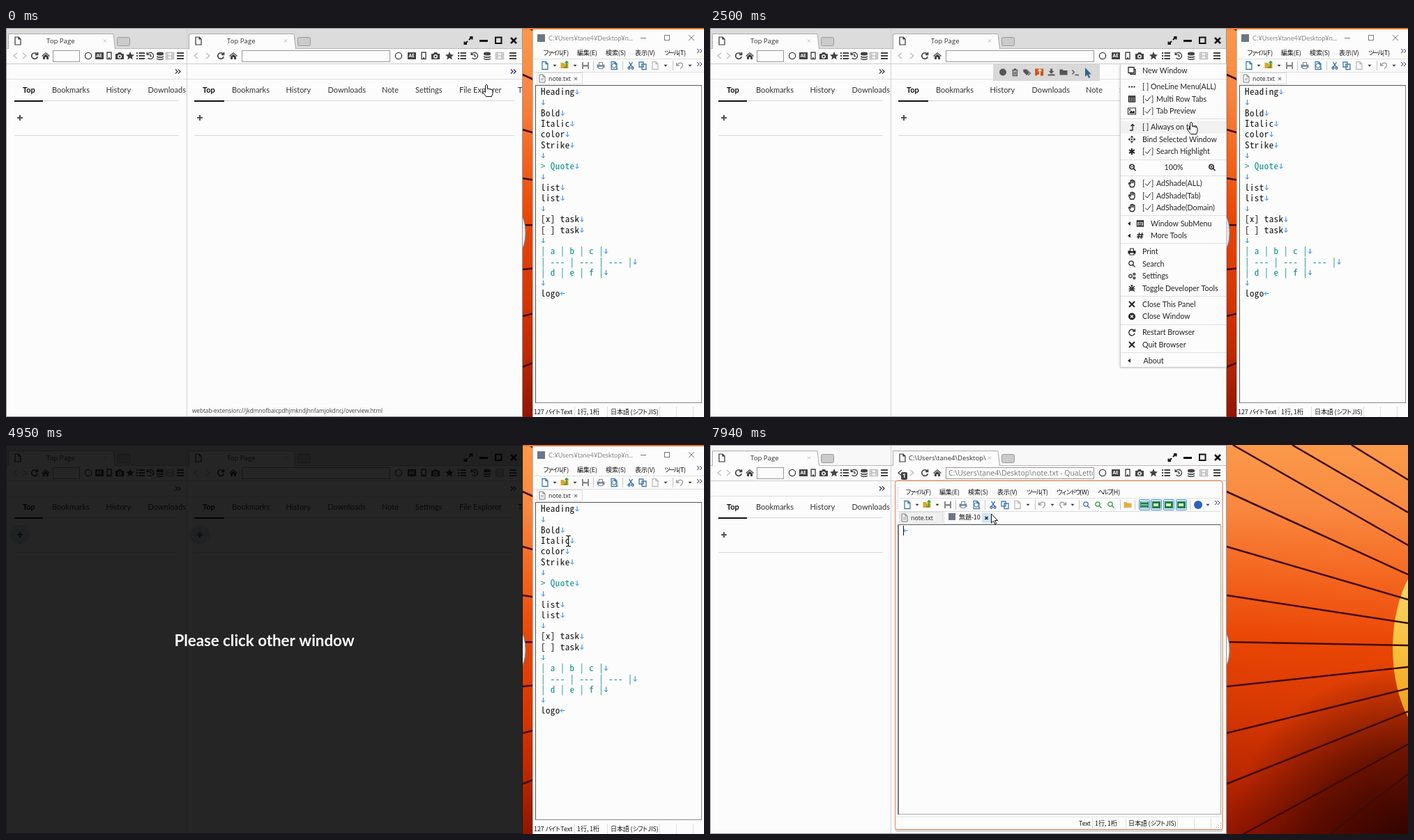
Write an HTML page with a canvas that moves like this. It is 1001 px wide and 559 px high and loops after 8000 ms.

```html
<!DOCTYPE html>
<html lang="ja">
<head>
<meta charset="utf-8">
<title>Bind a window</title>
<style>
html, body { margin: 0; width: 100%; height: 100%; overflow: hidden; background: #fcfcfc; }
canvas { display: block; }
</style>
</head>
<body>
<canvas id="stage" width="1001" height="559"></canvas>
<script>
const c = document.getElementById('stage').getContext('2d');
const LOOP = 8000, PAPER = '#fcfcfc';
const lato = (size, weight = 400) => `${weight} ${size}px Lato, sans-serif`;
const open = (size, weight = 400) => `${weight} ${size}px "Open Sans", sans-serif`;
const CJK = '9px "Noto Sans CJK JP", "Noto Sans CJK", sans-serif';
const MONO = '13px "Noto Sans Mono CJK JP", "Noto Sans Mono", monospace';
const PITCH = 6.93, ROW = 15.27;

// Each icon is centred on 0,0; the first letter says stroke or fill.
const ICONS = {
  back: 'sM3-4L-2 0L3 4', next: 'sM-3-4L2 0L-3 4',
  reload: 'sM3.5-2.5A4.3 4.3 0 1 0 4.2 1.2M4.5-5V-1.7H1',
  home: 'fM0-5L6 0L5 1L0-3.4L-5 1L-6 0ZM-4 1L0-2.4L4 1V5H1V2H-1V5H-4Z',
  ring: 'sM-4.6 0a4.6 4.6 0 1 0 9.2 0a4.6 4.6 0 1 0-9.2 0Z',
  dot: 'fM-5 0a5 5 0 1 0 10 0a5 5 0 1 0-10 0Z',
  box: 'fM-6-5H6V5H-6Z',
  phone: 'sM-3-5H3V4.5H-3ZM-1 3H1',
  camera: 'fM-6-3H-3L-2-5H2L3-3H6V5H-6ZM0-2a3 3 0 1 0 .01 0ZM0-.5a1.5 1.5 0 1 1-.01 0Z',
  star: 'fM0-6L1.8-2L6-1.6L2.8 1.2L3.8 5.4L0 3.1L-3.8 5.4L-2.8 1.2L-6-1.6L-1.8-2Z',
  list: 'sM-6-4H-4M-2.5-4H6M-6 0H-4M-2.5 0H6M-6 4H-4M-2.5 4H6',
  history: 'sM-4-2.5A4.6 4.6 0 1 1-3.5 3M-4.8-5V-1.7H-1.5M0-2.5V.5H2',
  base: 'fM-5-3.5A5 2 0 0 1 5-3.5V-2.5A5 2 0 0 1-5-2.5ZM-5-.8A5 2 0 0 0 5-.8V1A5 2 0 0 1-5 1ZM-5 2.5A5 2 0 0 0 5 2.5V4A5 2 0 0 1-5 4Z',
  film: 'sM-5.5-4.5H5.5V4.5H-5.5ZM-3-4.5V4.5M3-4.5V4.5M-5.5-1.5H-3M-5.5 1.5H-3M-3 0H3M3-1.5H5.5M3 1.5H5.5',
  bars: 'sM-5-4H5M-5 0H5M-5 4H5',
  page: 'sM-4-5.5H1L4-2.5V5.5H-4ZM1-5.5V-2.5H4',
  full: 'sM1-1L5-5M2-5H5.5V-1.5M-1 1L-5 5M-5.5 1.5V5H-2',
  cross: 'sM-4-4L4 4M4-4L-4 4', small: 'sM-2-2L2 2M2-2L-2 2',
  more: 'sM-3-3L0 0L-3 3M1-3L4 0L1 3',
  plus: 'sM-4 0H4M0-4V4', check: 'sM-4 0L-1 3L4-3.5',
  panes: 'sM-5-5H3V3H-5ZM-2 3V5H5V-2H3',
  dots: 'fM-4.5-1h2v2h-2ZM-1-1h2v2h-2ZM2.5-1h2v2h-2Z',
  table: 'sM-4.5-4H4.5V4H-4.5ZM-4.5-1.3H4.5M-4.5 1.4H4.5M-1.5-4V4M1.5-4V4M-4.5-3.3H4.5',
  image: 'fM-6-5H6V5H-6ZM-5-4V4H5V-4ZM-4 3L-1-1L1 1L3-1L4 1V3ZM-4-3h2v2h-2Z',
  up: 'sM-3 4.5H1V-4M-1.5-1.5L1-4L3.5-1.5',
  move: 'fM0-5.5L2.2-2.5H-2.2ZM0 5.5L2.2 2.5H-2.2ZM-5.5 0L-2.5-2.2V2.2ZM5.5 0L2.5-2.2V2.2ZM-1-1H1V1H-1Z',
  aster: 'sM0-4.5V4.5M-4-2.3L4 2.3M4-2.3L-4 2.3',
  find: 'sM-4.2-1a3.2 3.2 0 1 0 6.4 0a3.2 3.2 0 1 0-6.4 0ZM1.5 1.5L4.5 4.5',
  minus: 'sM-2.5-1H.5', add: 'sM-2.5-1H.5M-1-2.5V.5',
  palm: 'sM-4 1Q-5-1-3.5-1L-2 .5V-4Q-1-5.5 0-4.5Q1-6 2-4Q3.5-4.5 4-2.5V2L2.5 5H-2ZM0-4V-.5M2-3.5V-.5',
  left: 'fM2-3V3L-2 0Z', down: 'fM-2.5-1.2H2.5L0 1.6Z',
  panel: 'sM-4.5-4H4.5V4H-4.5ZM-4.5-3H4.5M-3-.5H3M-3 2H3',
  hash: 'sM-1-4.5L-3 4.5M3-4.5L1 4.5M-4.5-1.5H4.5M-5 1.5H4',
  print: 'fM-3-5H3V-1.5H5.5V3H3.5V5H-3.5V3H-5.5V-1.5H-3ZM-2-4V-1H2V-4ZM-2.5 1.5V4H2.5V1.5Z',
  gears: 'sM-4.3 0a2.3 2.3 0 1 0 4.6 0a2.3 2.3 0 1 0-4.6 0M2-2.8a1.4 1.4 0 1 0 2.8 0a1.4 1.4 0 1 0-2.8 0M2 2.8a1.4 1.4 0 1 0 2.8 0a1.4 1.4 0 1 0-2.8 0',
  bug: 'sM0-3.5V4M-1.6-2V3.5M1.6-2V3.5M-4.5 .8H4.5M-4-3L-2-1M4-3L2-1M-4 4.5L-2 2.5M4 4.5L2 2.5M-1.5-4H1.5',
  trash: 'sM-4-3H4M-1.5-4.5H1.5M-3-3V5H3V-3M-1-1V3.5M1-1V3.5',
  tags: 'fM-5.5-4H-2L3 1L-.5 4.5L-5.5-.5ZM-.5-4L5.5 1.5L2 5L1 4L4 1.3L-2-4Z',
  load: 'fM-1.5-5H1.5V-1.5H4L0 2.5L-4-1.5H-1.5ZM-5 3H5V5H-5Z',
  folder: 'fM-5.5-4H-1.5L-.5-2.5H5.5V4H-5.5Z',
  shell: 'sM-5-3L-2 0L-5 3M-1 4H4.5',
  arrow: 'fM0 0V13L3 10.2L5.2 15L7.2 14.1L5 9.5H9Z',
  hand: 'fM-1.5 1.5Q0-1 1.5 1.5V6.5Q3 5.5 4.3 7Q5.8 6.2 7 7.7Q8.7 7.2 9 9V13L7.5 17.5H-.5L-5 11.5Q-5.3 9.5-3.5 9.8L-1.5 11.5Z',
  beam: 'sM-3.5-7H-1L0-6L1-7H3.5M0-6V7M-3.5 8H-1L0 7L1 8H3.5',
  save: 'fM-5-5H5V5H-5ZM-3-5V-1H3V-5ZM-3 1.5V5H3V1.5Z',
  cut: 'sM-2.5-5L2 2M2.5-5L-2 2M-4 3.5a1.5 1.5 0 1 0 3 0a1.5 1.5 0 1 0-3 0M1 3.5a1.5 1.5 0 1 0 3 0a1.5 1.5 0 1 0-3 0',
  copy: 'sM-5-5H1V2H-5ZM-1-2H5V5.5H-1Z',
  undo: 'sM-4.5-4V0H-.5M-4.5 0Q0-6 4-2.5Q5.5 1 1 4.5',
  redo: 'sM4.5-4V0H.5M4.5 0Q0-6-4-2.5Q-5.5 1-1 4.5',
  line: 'sM0-3.5V3.5M-2.5 1L0 3.5L2.5 1', eof: 'sM3 0H-3M-.5-2.5L-3 0L-.5 2.5',
};
const paths = {};
for (const k in ICONS) paths[k] = new Path2D(ICONS[k].slice(1));

function icon(name, x, y, color = '#444', width = 1.3) {
  c.save();
  c.translate(x, y);
  c.fillStyle = c.strokeStyle = color;
  c.lineWidth = width;
  if (ICONS[name][0] === 'f') c.fill(paths[name], 'evenodd');
  else c.stroke(paths[name]);
  c.restore();
}
function rect(x, y, w, h, color) { c.fillStyle = color; c.fillRect(x, y, w, h); }
function frame(x, y, w, h, color) {
  c.strokeStyle = color; c.lineWidth = 1;
  c.strokeRect(x + .5, y + .5, w - 1, h - 1);
}
function round(x, y, w, h, r, fill, stroke) {
  c.beginPath(); c.roundRect(x, y, w, h, r);
  if (fill) { c.fillStyle = fill; c.fill(); }
  if (stroke) { c.strokeStyle = stroke; c.lineWidth = 1; c.stroke(); }
}
// y is the middle of the capitals.
function text(s, x, y, font, color = '#222', spacing = 0) {
  c.font = font;
  c.letterSpacing = spacing + 'px';
  c.fillStyle = color;
  c.fillText(s, x, y + .36 * parseFloat(font.match(/[\d.]+(?=px)/)));
}
// Japanese interface text sets its katakana tightly.
function label(s, x, y) {
  for (const run of s.split(/([ァ-ヶー]+)/)) {
    text(run, x, y, CJK, '#111', /[ァ-ヶ]/.test(run) ? -2.4 : -.1);
    x += c.measureText(run).width;
  }
}
function clip(x, y, w, h, draw) {
  c.save(); c.beginPath(); c.rect(x, y, w, h); c.clip(); draw(); c.restore();
}
function disc(x, y, r, color) {
  c.fillStyle = color; c.beginPath(); c.arc(x, y, r, 0, 7); c.fill();
}
function blend(gradient, ...colors) {
  colors.forEach((color, i) => gradient.addColorStop(i / (colors.length - 1), color));
  return gradient;
}

function wallpaper() {
  rect(741, 0, 260, 559, blend(c.createLinearGradient(860, 0, 830, 560),
    '#fb9a4a', '#f98840', '#f4661f', '#ea4606', '#d93a03', '#c02a01', '#941600'));
  rect(741, 300, 260, 259, blend(c.createRadialGradient(1001, 580, 20, 1001, 580, 260),
    'rgba(40,2,0,.9)', 'rgba(50,2,0,.6)', 'rgba(60,4,0,0)'));
  c.fillStyle = blend(c.createLinearGradient(0, 190, 0, 395), '#fbd768', '#f8c03c', '#ee9c18');
  c.beginPath(); c.ellipse(1060, 292, 81, 145, 0, 0, 7); c.fill();
  c.strokeStyle = '#3f0a08';
  c.lineWidth = 2.5;
  [[920, 0, 50], [835, 0, 97], [750, 0, 144], [741, 67, 186], [741, 146, 222], [741, 216, 256],
   [741, 283, 288], [741, 347, 319], [741, 414, 350], [741, 487, 383], [765, 559, 430], [889, 559, 473]]
    .forEach(([x, y, end]) => { c.beginPath(); c.moveTo(x, y); c.lineTo(1001, end); c.stroke(); });
  clip(741, 260, 10, 70, () => {
    c.fillStyle = '#eee'; c.strokeStyle = '#888'; c.lineWidth = 1;
    c.beginPath(); c.ellipse(737, 294, 8, 25, 0, 0, 7); c.fill(); c.stroke();
  });
}

const TOOLS = ['ring', 'box', 'phone', 'camera', 'star', 'list', 'history', 'base', 'film', 'bars'];
function browserBar(x, title, bound, nav, input, tools, hot) {
  c.fillStyle = PAPER; c.strokeStyle = '#aaa'; c.lineWidth = 1;
  c.beginPath(); c.moveTo(x + 3.5, 30); c.lineTo(x + 3.5, 8.5);
  c.lineTo(x + 154, 8.5); c.lineTo(x + 156.5, 30); c.fill(); c.stroke();
  icon('page', x + 17, 18.5, '#333', 1.2);
  text(title, x + (bound ? 26 : 58), 18.5, open(9.6), '#333');
  icon('small', x + 142, 18.5, '#bbb', 1);
  round(x + 159.5, 13.5, 18, 12, 2, '#cbcbcb', '#999');
  icon('back', nav[0], 40, bound ? '#444' : '#bbb');
  icon('next', nav[1], 40, '#bbb');
  icon('reload', nav[2], 40, '#444', 1.7);
  icon('home', nav[3], 40);
  rect(input[0], 32, input[1], 17, PAPER);
  frame(input[0], 32, input[1], 17, '#999');
  TOOLS.forEach((name, i) => {
    const wide = name === 'list' || name === 'bars';
    const color = name === 'film' ? '#bbb' : name === 'bars' && hot ? '#00f' : '#444';
    icon(name, tools[i], 40, color, wide ? 2 : 1.4);
  });
  text('AE', tools[1] - 4.5, 40, open(6.5, 700), '#fff');
}

const TABS = [['Bookmarks', 54], ['History', 131.5], ['Downloads', 191.5], ['Note', 269], ['Settings', 317], ['File Explorer', 380], ['Terminal', 464]];
function topPage(x, end, glow) {
  rect(x, 104, end - x, 1, '#d4d4d4');
  rect(x, 104, x < 100 ? 41 : 43, 2, '#111');
  text('Top', x + 12, 89.5, lato(11, 700), '#111');
  for (const [s, dx] of TABS) text(s, x + dx, 89.5, lato(11), '#333');
  if (glow) disc(x + 8, 129, 14, '#c9e4e2');
  icon('plus', x + 8, 129, '#555', 2.2);
  rect(x, 154, end - x, 1, '#d8d8d8');
}

function browser(t) {
  const bound = t >= 5950, dim = t >= 3970 && !bound;
  rect(0, 0, 741, 559, PAPER);
  rect(0, 0, 741, 30, bound ? '#f8f8f8' : '#dcdcdc');
  rect(0, 29, 741, 1, '#b8b8b8');
  clip(0, 0, 259, 559, () => {
    browserBar(0, 'Top Page', false, [13, 27, 41, 57], [67, 39], [118, 134, 148, 163, 178, 193, 207, 221, 235, 250]);
    topPage(12, 248, dim);
  });
  clip(259, 0, 482, 559, () => {
    browserBar(259, bound ? 'C:\\Users\\tane4\\Desktop\\' : 'Top Page', bound, [272, 290, 308, 326], [338, 213],
      [563, 582, 599, 616, 636, 654, 672, 690, 708, 727], t >= 500 && t < 1990);
    if (!bound) topPage(270, 729, dim);
  });
  rect(0, 51, 741, 1, '#ccc');
  rect(0, 73, bound ? 259 : 741, 1, '#ddd');
  icon('more', 246, 62.5, '#333', 1.2);
  if (!bound) icon('more', 727, 62.5, '#225', 1.2);
  rect(259, 0, 1, 559, '#d0d0d0');
  icon('full', 663, 18, '#111', 2);
  rect(679, 17, 12, 3, '#111');
  c.strokeStyle = '#111'; c.lineWidth = 2; c.strokeRect(702, 13.5, 8.5, 8.5);
  icon('cross', 728, 18, '#111', 2.6);
  if (t < 500) text('webtab-extension://jkdmnofbaicpdhjmkndjhnfamjokdncj/overview.html', 267, 550, open(8.2), '#444');
  if (bound) {
    round(274, 39, 9, 11, 2, '#444');
    text('1', 276, 44.5, open(8, 700), '#fff');
    clip(339, 33, 210, 15, () => text('C:\\Users\\tane4\\Desktop\\note.txt - QuaLetto', 342, 40.5, open(10.4), '#777'));
  }
  frame(0, 0, 741, 559, '#999');
}

const MENU = [
  [61.5, 'panes', 'New Window'], [84.5, 'dots', 'OneLine Menu(ALL)', 0], [102, 'table', 'Multi Row Tabs', 1],
  [119.5, 'image', 'Tab Preview', 1], [142.5, 'up', 'Always on top', 0], [160, 'move', 'Bind Selected Window'],
  [177.5, 'aster', 'Search Highlight', 1], [223.5, 'palm', 'AdShade(ALL)', 1], [241, 'palm', 'AdShade(Tab)', 1],
  [258.5, 'palm', 'AdShade(Domain)', 1], [281, 'panel', 'Window SubMenu', 2], [298.5, 'hash', 'More Tools', 2],
  [321.5, 'print', 'Print'], [339, 'find', 'Search'], [356.5, 'gears', 'Settings'], [374, 'bug', 'Toggle Developer Tools'],
  [397, 'cross', 'Close This Panel'], [414.5, 'dot', 'Close Window'], [437.5, 'reload', 'Restart Browser'],
  [455, 'cross', 'Quit Browser'], [478, 'left', 'About']];
function menu(t) {
  rect(406, 52, 153, 24, '#d9d9d9');
  ['dot', 'trash', 'tags', 'box', 'load', 'folder', 'shell'].forEach((name, i) =>
    icon(name, 420 + i * 17.4, 63.5, i === 3 ? '#c9561c' : '#555'));
  icon('up', 472, 63.5, '#fff');
  icon('arrow', 538, 57, '#2d6390');
  c.save();
  c.shadowColor = 'rgba(0,0,0,.25)'; c.shadowBlur = 3; c.shadowOffsetY = 1;
  rect(588, 52, 153, 435, PAPER);
  c.restore();
  frame(588, 51, 153, 437, '#ccc');
  for (const y of [73, 130, 189, 212, 269, 309, 385, 426, 466]) rect(589, y, 151, 1, '#e0e0e0');
  const hover = t >= 2970 ? 5 : t >= 2500 ? 4 : t >= 1990 ? 0 : -1;
  MENU.forEach(([y, name, title, kind], i) => {
    if (i === hover) rect(589, y - 8.5, 151, 17.5, '#f1f1f1');
    const font = lato(10.7), sub = kind === 2;
    icon(name, sub ? 617 : name === 'left' ? 601 : 605, y, '#222', name === 'cross' || name === 'aster' ? 2 : 1.3);
    if (name === 'dot') icon('small', 605, y, '#fff', 1.3);
    if (sub) icon('left', 601, y, '#222');
    if (kind === 0) text('[ ]', 620, y, font);
    if (kind === 1) {
      text('[', 620, y, font); text(']', 633, y, font);
      icon('check', 628, y, '#222', 1);
    }
    text(title, [632, 640, 632][kind] ?? (name === 'left' ? 621.5 : 620), y, font);
  });
  text('100%', 651.5, 200.5, lato(10.7));
  for (const [x, sign] of [[606, 'minus'], [720, 'add']]) {
    icon('find', x, 200.5, '#222', 1.6);
    icon(sign, x, 200.5, '#222', 1);
  }
}

const NOTE = ['Heading', '', 'Bold', 'Italic', 'color', 'Strike', '', '> Quote', '', 'list', 'list', '', '[x] task', '[ ] task', '',
  '| a | b | c |', '| --- | --- | --- |', '| d | e | f |', '', 'logo'];
function note(selected) {
  c.font = MONO; c.letterSpacing = '0px';
  const gap = PITCH - c.measureText('M').width;
  NOTE.forEach((s, i) => {
    const y = 123.5 + i * ROW, end = 277 + s.length * PITCH, marked = selected && (i === 2 || i === 3);
    if (selected && i < 4) {
      const from = i ? 277 : end;
      rect(from, y - 8, end - from + (i < 3 ? PITCH : 0), ROW + .3, '#3399ff');
    }
    text(s, 277, y, MONO, marked ? '#e4f1ff' : /^[>|]/.test(s) ? '#0b8c8c' : '#111', gap);
    if (!(selected && i < 3)) icon(i === 19 ? 'eof' : 'line', end + 3.5, y, '#1e86f0', 1);
    else if (i < 2) icon('line', end + 3.5, y, '#1c5fb0', 1);
  });
}

const MENUBAR = [[280, 'ファイル(F)'], [329, '編集(E)'], [370, '検索(S)'], [412, '表示(V)'],
  [454, 'ツール(T)'], [497, 'ウィンドウ(W)'], [556, 'ヘルプ(H)']];
const BUTTONS = [['page', 283, '#3a78b5'], ['folder', 311, '#d9a72f'], ['save', 341, '#888'], ['print', 363, '#77889a'],
  ['page', 382, '#4a80b0'], ['cut', 406, '#2a62b0'], ['copy', 423, '#3d78b8'], ['page', 441, '#bbb'], ['undo', 476, '#999'],
  ['redo', 506, '#999'], ['find', 540, '#3c6fae'], ['find', 557, '#3c8f4a'], ['find', 575, '#3c8f4a'], ['folder', 599, '#dfb043']];
// The small editor, laid out as it sits inside the panel.
function editor(limit, blank) {
  for (const [x, s] of MENUBAR) if (x < limit) label(s, x, 67.5);
  for (const [name, x, color] of BUTTONS) if (x < limit) icon(name, x, 86, color);
  icon('up', 313, 84, '#3b9b35', 1.6);
  icon('find', 383, 87, '#356c9c', 1);
  for (const x of [297, 326, 456, 491, 520, 714]) if (x < limit) icon('down', x, 86, '#333');
  for (const x of [352, 394, 466, 529, 588, 609, 688]) if (x < limit) rect(x, 79, 1, 14, '#c4c4c4');
  if (limit > 700) {
    for (const x of [623, 640, 658, 676]) {
      round(x - 7.5, 78.5, 15, 15, 1, '#d4e9fa', '#3d93e0');
      icon('box', x, 86, '#1f7d4a');
      if (x === 623) icon('bars', x, 86, '#e8fff0', 1); else rect(x - 4, 84, 7, 4, '#d8efa8');
    }
    disc(700, 86, 6, '#2c62c0');
  }
  const width = blank ? 63 : 66;
  rect(271, 96, width, 17, blank ? '#f0f0f0' : PAPER);
  frame(271, 96, width, 17, '#ddd');
  icon('page', 279, 104.5, '#777', 1);
  rect(277, 104, 4, 1, '#999'); rect(277, 106, 4, 1, '#999');
  text('note.txt', 288, 104.5, open(8.8), '#222');
  if (!blank) icon('small', 327, 105, '#888', 1.2);
}

function floatingEditor() {
  rect(755, 2, 246, 557, PAPER);
  rect(762, 9, 11, 11, '#6d7686');
  text('C:¥Users¥tane4¥Desktop¥n...', 778, 14.5, lato(9.2), '#888');
  rect(910, 14, 8, 1, '#777');
  frame(944, 10, 8, 8, '#777');
  icon('cross', 983, 14, '#777', 1);
  rect(757, 44, 244, 1, '#ddd');
  rect(757, 63, 244, 1, '#ddd');
  icon('more', 994, 33, '#336', 1);
  icon('more', 994, 52, '#336', 1);
  frame(759, 82, 239, 457, '#888');
  rect(759, 82, 239, 1, '#555'); rect(759, 82, 1, 457, '#555');
  c.save();
  c.translate(490, -32);
  editor(495, false);
  note(false);
  c.restore();
  label('127 バイト Text', 757, 551.5);
  label('1行, 1桁', 819, 551.5);
  label('日本語 (シフト JIS)', 867, 551.5);
  for (const x of [815, 862, 937, 961, 985]) rect(x, 544, 1, 15, '#ddd');
  rect(755, 2, 1, 557, '#bbb');
}

function boundEditor(t) {
  const blank = t >= 7940;
  round(265, 50, 471, 506, 4, '#d8d8d8');
  round(265.5, 51.5, 469.5, 501, 3, PAPER, '#e8804a');
  for (let y = 61; y < 94; y += 3) if (y !== 76) rect(269, y, 1, 1, '#aaa');
  rect(268, 76, 464, 1, '#e2e2e2');
  rect(268, 95, 464, 1, '#ddd');
  editor(999, blank);
  icon('more', 727, 83, '#336', 1);
  frame(269, 114, 464, 417, '#aaa');
  rect(269, 114, 463, 1, '#555'); rect(269, 114, 2, 417, '#777');
  if (blank) {
    rect(335, 95, 70, 18, PAPER);
    frame(335, 95, 70, 19, '#ddd');
    rect(342, 98, 10, 10, '#6d7686');
    label('無題-10', 357, 104);
    rect(390, 98, 13, 14, '#cfe6f8');
    icon('small', 396.5, 105, '#222', 1.6);
    icon('eof', 280.5, 123, '#1e86f0', 1);
    rect(277, 116, 1, 14, '#111');
  } else {
    note(true);
    if ((t >= 6470 && t < 6940) || t >= 7430) rect(325, 116, 1, 15, '#111');
    label('127 バイト (127 バイト), 20 行。', 267, 543.5);
  }
  rect(267, 534, 467, 1, '#e4e4e4');
  label('Text', 529, 543.5);
  label(blank ? '1行, 1桁' : '1行, 8桁', 552, 543.5);
  label('日本語 (シフト JIS)', 600, 543.5);
  for (const x of [548, 596, 670, 694, 718]) rect(x, 536, 1, 15, '#ddd');
  for (let i = 0; i < 3; i++) for (let j = 0; j <= i; j++) rect(732 - j * 3, 543 + i * 3, 1, 1, '#888');
}

const CURSOR = [[0, 'hand', 689, 81], [500, 'hand', 721, 46], [1000, 'hand', 723, 45], [1990, 'hand', 704, 64],
  [2500, 'hand', 690, 135], [2970, 'hand', 653, 154], [3970, 'arrow', 653.5, 154.5], [4460, 'arrow', 682, 144],
  [4950, 'beam', 806.5, 137.5], [5950, 'arrow', 806, 137], [6470, 'arrow', 802.5, 136], [6940, 'beam', 595, 158],
  [7430, 'arrow', 567, 99], [7940, 'arrow', 403.5, 99]];
function cursor(t) {
  const [, name, x, y] = CURSOR.findLast(k => k[0] <= t);
  if (t >= 3470 && t < 3970) disc(653, 154.5, 9.5, 'rgba(250,222,40,.85)');
  if (name === 'beam') return icon(name, x, y, '#111', 1.2);
  icon(name, x, y, '#fff');
  c.save();
  c.translate(x, y);
  c.strokeStyle = '#111'; c.lineWidth = 1;
  c.stroke(paths[name]);
  c.restore();
}

function draw(now) {
  const t = now % LOOP;
  wallpaper();
  if (t < 5950) {
    rect(741, 0, 260, 2, '#f07a35');
    floatingEditor();
  }
  browser(t);
  if (t >= 1000 && t < 3970) menu(t);
  if (t >= 3970 && t < 5950) {
    rect(0, 0, 741, 559, 'rgba(0,0,0,.85)');
    c.textAlign = 'center';
    text('Please click other window', 370.5, 281, lato(22.3, 700), '#fff');
    c.textAlign = 'left';
  }
  if (t >= 5950) boundEditor(t);
  cursor(t);
  requestAnimationFrame(draw);
}
requestAnimationFrame(draw);
</script>
</body>
</html>
```
